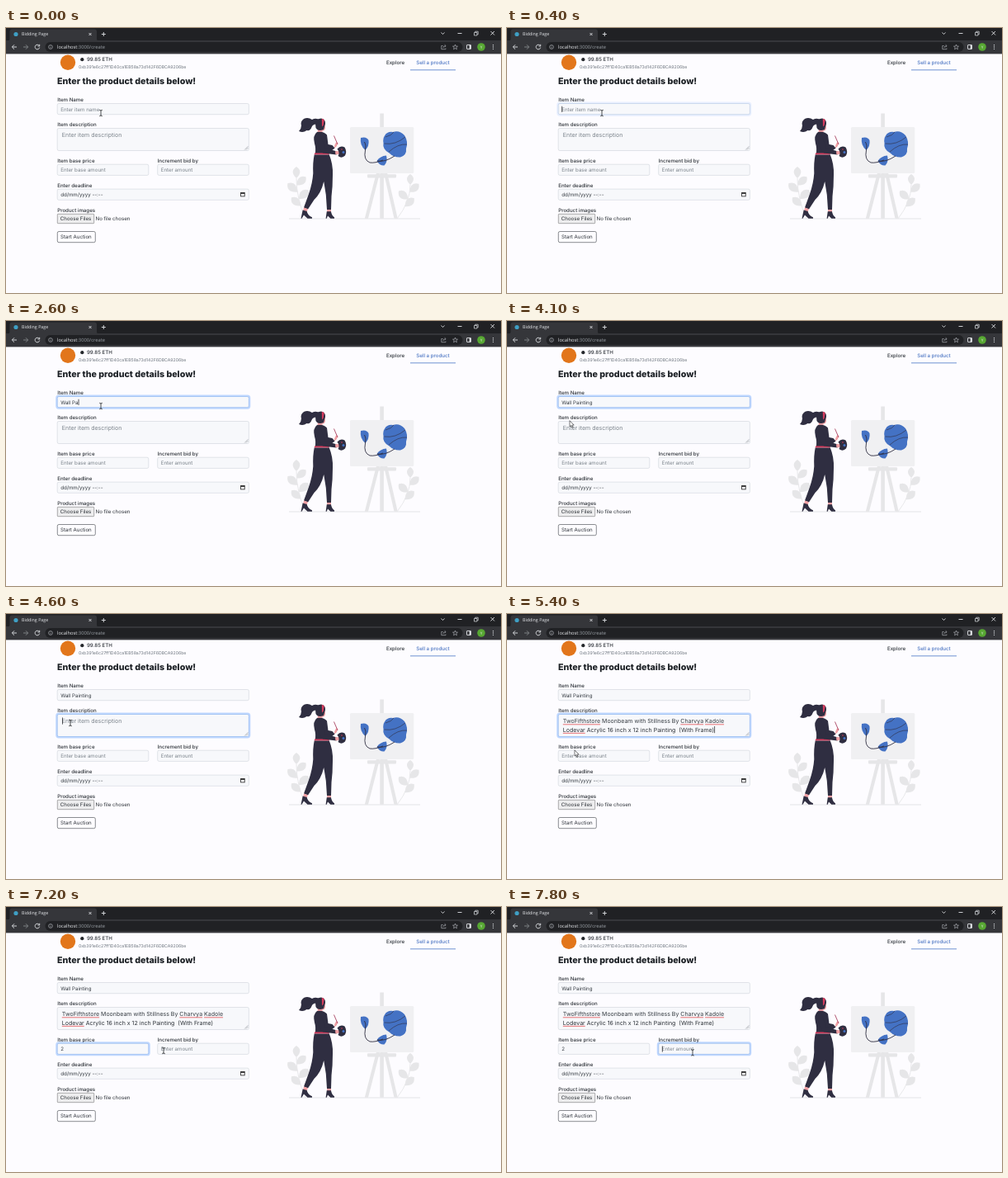
An HTML page that plays this animation: 600 by 321 pixels, repeating every 8000 ms.

```html
<!DOCTYPE html>
<html lang="en">
<head>
<meta charset="utf-8">
<title>Bidding Page</title>
<style>
  html, body { margin: 0; width: 100%; height: 100%; overflow: hidden; background: #fdfcff; }
  svg { display: block; width: 100%; height: 100%; }
  text { font-family: Inter, sans-serif; font-size: 6.15px; fill: #2b3036; white-space: pre; text-rendering: geometricPrecision; }
  .ui { font-family: "Open Sans", sans-serif; fill: #e8eaed; }
  .label, .nav { font-weight: 500; }
  .hint { fill: #6c757d; }
  .big { font-size: 7.03px; }
  .line { fill: none; stroke: #dfe1e5; stroke-width: .9; }
  .field { fill: #f7f8fb; stroke: #ced4da; stroke-width: .6; }
  .dark { fill: #2f2e41; }
  .skin { fill: #f0a0a4; }
  .red { fill: #d63c5e; }
  .blue { fill: #4472c4; }
  .pale { fill: #e6e6e8; }
  .ink { fill: none; stroke: #2f2e41; stroke-width: .9; }
</style>
</head>
<body>
<svg viewBox="0 0 600 321">
  <rect width="600" height="321" fill="#fdfcff"/>

  <!-- browser bar -->
  <rect width="600" height="16" fill="#202124"/>
  <path d="M2 15.5Q4.500 15.500 4.500 13V4.500Q4.500 1.500 7.500 1.500H107Q110 1.500 110 4.500V13Q110 15.500 112.500 15.500Z" fill="#35363a"/>
  <rect y="15" width="600" height="16.400" fill="#35363a"/>
  <rect x="47.500" y="17" width="506" height="12" rx="6" fill="#202124"/>
  <circle cx="12" cy="7.500" r="2.600" fill="#3f9fc4"/>
  <text class="ui" x="19" y="9.400" style="font-size:5.3px">Bidding Page</text>
  <text class="ui" x="62" y="25.200" style="font-size:5.8px">localhost<tspan fill="#9aa0a6">:3000/create</tspan></text>
  <g class="line">
    <path d="M100.500 6L103.500 9M103.500 6L100.500 9M115.800 7.500H120.800M118.300 5V10"/>
    <path d="M527.500 5.500L529.500 7.500L531.500 5.500M547.500 6.500H552.500M587.500 4L592 8.500M592 4L587.500 8.500"/>
    <path d="M567.500 5.500H571V9H567.500ZM568.700 5.300V4.200H572.200V7.800H571.200" stroke-width=".7"/>
    <path d="M13 23H7.500M10 20.300L7.300 23L10 25.700"/>
    <path d="M21 23H26.500M24 20.300L26.700 23L24 25.700" stroke="#85888c"/>
    <path d="M40.300 21.500A2.800 2.800 0 1 0 40.700 23.600M40.700 19.800V22H38.500"/>
    <g stroke="#a9adb2" stroke-width=".7">
      <circle cx="54" cy="23" r="2.400"/>
      <path d="M54 22.700V24.400M54 21.500V22"/>
      <path d="M529.500 21.500H527.800V25.700H533V24.500M529.800 24Q530 21.700 532.800 21.700M531.700 20.300L533.200 21.700L531.700 23.100"/>
      <path d="M544.500 20L545.300 22.100L547.500 22.200L545.800 23.600L546.400 25.800L544.500 24.600L542.600 25.800L543.200 23.600L541.500 22.200L543.700 22.100Z"/>
    </g>
    <rect x="558.500" y="20.500" width="5" height="5" rx=".5"/>
    <path d="M562.400 20.500V25.500" stroke-width="1.500"/>
  </g>
  <circle cx="576" cy="23" r="4.800" fill="#57a832"/>
  <text class="ui" x="576" y="24.800" text-anchor="middle" style="font-size:4.8px">Y</text>
  <g fill="#dfe1e5"><circle cx="590.500" cy="20.700" r=".65"/><circle cx="590.500" cy="23" r=".65"/><circle cx="590.500" cy="25.300" r=".65"/></g>

  <!-- page header -->
  <circle cx="75" cy="41.700" r="9.200" fill="#e2761b"/>
  <circle cx="92.300" cy="38.200" r="2.100" fill="#25282c"/>
  <text class="nav" x="98" y="40.400">99.85 ETH</text>
  <text class="hint" x="88" y="48.600" style="font-size:5.2px">0xb391e6c27ff1D40ca1EB58a73d142F6DBCA9206be</text>
  <text class="nav" x="461" y="44.200">Explore</text>
  <text class="nav" x="497.300" y="44.200" style="fill:#4a74c2">Sell a product</text>
  <rect x="490" y="50.400" width="55" height=".9" fill="#5f86cc"/>
  <text x="62" y="68.200" style="font-size:10.7px;font-weight:800;fill:#1c2025">Enter the product details below!</text>

  <!-- form -->
  <g id="form"></g>
  <path d="M291 147.500L293.500 145M289.200 147.500L293.500 143.200" stroke="#777c82" stroke-width=".5"/>
  <g fill="none" stroke="#222" stroke-width=".8"><rect x="284.600" y="199.500" width="4.600" height="4.400"/><path d="M284.600 200.200H289.200" stroke-width="1.300"/></g>
  <rect x="62.300" y="225.300" width="44.400" height="11.400" rx=".8" fill="#ededee" stroke="#767676" stroke-width=".6"/>
  <text x="65.800" y="233.200">Choose Files</text>
  <text x="108.500" y="233.200">No file chosen</text>
  <rect x="62.300" y="246.500" width="46" height="13.200" rx="1.800" fill="#fdfcff" stroke="#2b3036" stroke-width=".55"/>
  <text x="66" y="255.400">Start Auction</text>

  <!-- illustration -->
  <rect x="343" y="230.600" width="159" height=".8" fill="#dcdce0"/>
  <g id="plants" class="pale"></g>
  <g class="pale">
    <rect x="453.300" y="103.500" width="4.600" height="20"/>
    <path d="M448.800 176H453L439 230.700H434.800ZM458 176H462.200L474.700 230.700H470.500Z"/>
    <rect x="453.300" y="176" width="4.600" height="54.700"/>
    <rect x="417" y="120" width="77.300" height="56" rx="1.500" fill="#f0f0f2"/>
    <rect x="438" y="177.200" width="35" height="4.200" rx="1"/>
  </g>
  <path class="blue" d="M459 130.500Q462 125 469 126Q477 123.500 483 130Q488 138 485 146Q486 154 478 156.500Q470 157 464.500 151.500Q456 147 457.500 139Q456.500 134 459 130.500Z"/>
  <path class="blue" d="M430 133Q437 131 439.500 136Q440.500 143 435.500 148Q428.500 142 430 133ZM461 154.500Q463 162 458.500 166.500Q453 167 449.500 161Q453.500 155 461 154.500Z"/>
  <path class="ink" d="M434.500 138Q437 141 435.500 148Q433 160 441 163Q447 164 457 160M450 161Q459 163 471 155"/>
  <path class="ink" style="stroke-width:.6" d="M460 132Q468 130 470 126M458.500 140Q472 142 484 132M464 150Q475 140 486 141"/>

  <path class="dark" d="M381 112Q376 108 371 111Q366 107.500 361 110Q356.500 113 358 118Q358 122 355 125Q360 127.500 364.500 124Q369 125 370.500 120Q372 116 377 116.500Z"/>
  <path class="skin" d="M380 116L386.800 115L387 121.500Q386 125 383.500 124.500L383.500 129H377.500L378 121Z"/>
  <path class="dark" d="M375 116Q376 109.500 382 109.500Q387.500 110.500 387 116Q386 119 385 123Q378 125.500 375.500 121Z"/>
  <path class="red" d="M382.800 109.700L385.800 111L384.600 118L383 119.500Z"/>
  <path class="skin" d="M398.500 141.500L400 138.500L402.300 138.800L401 143L397.500 146Z"/>
  <path d="M397.500 130.500L402 141" stroke="#a8405f" stroke-width=".9"/>
  <path class="dark" d="M377 126Q385 124.500 389 129.500L390.500 141L395.500 142L398.500 145.500Q395 149 390.500 149L391 153H374.500Q376 146 374 140Q371.500 130 377 126Z"/>
  <path class="red" d="M374 151.600H391.800V153.600H373.700Z"/>
  <path class="dark" d="M375 129Q380 127 382.500 133L386.500 145L401 149.500L400.500 153.500L384 151.500Q377.500 145 375 129Z"/>
  <path class="skin" d="M399 149.300L404 149L404.500 152.500L399.500 153.500Z"/>
  <path class="dark" d="M401.500 146.500Q405.500 141.500 410.500 144.500Q413.500 149.500 411 154.500Q407 158.500 402.500 155Q405 151 401.500 146.500Z"/>
  <g><circle class="red" cx="407" cy="147" r=".8"/><circle class="blue" cx="409" cy="150.500" r="1.500"/></g>
  <path class="dark" d="M373.700 153.600H391.800Q396.500 165 396 178Q396 192 394.500 204L394 220H389L387.800 202L385.200 186Q382 200 373.500 208L366 219.500L361 217.500L367 201Q371.500 188 372.300 176Q371.700 163 373.700 153.600Z"/>
  <path class="skin" d="M361 217.500L366 219.300L364.500 222.500L360.300 221ZM389 220H394V223H389.200Z"/>
  <path class="dark" d="M359.700 220.500L364.700 222Q365.500 227 371 229.200V230.700H365.500L361 226.500L358.500 230.700H357.500ZM388.800 222.300H394Q394.500 227 398 229.200V230.700H393.300L390 227.500L388.700 230.700H387.600Z"/>

  <g id="underlines" stroke="#e0363c" stroke-width=".7"></g>
  <rect id="caret" width=".7" fill="#16181b"/>
  <g id="mouse">
    <path id="beam" d="M-1.800 -3.700Q0 -3.700 0 -2.700Q0 -3.700 1.800 -3.700M0 -3V3M-1.800 3.700Q0 3.700 0 2.700Q0 3.700 1.800 3.700" fill="none" stroke="#25272a" stroke-width=".8"/>
    <path id="arrow" d="M0 0V7.300L1.700 5.800L2.900 8.500L4.100 8L2.900 5.400H5.200Z" fill="#fff" stroke="#1c1d1f" stroke-width=".6"/>
  </g>
</svg>
<script>
const LOOP = 8000, STEP = 100, ROW = 10.55;
const $ = id => document.getElementById(id);

function add(parent, tag, attrs, content = '') {
  const el = document.createElementNS('http://www.w3.org/2000/svg', tag);
  for (const k in attrs) el.setAttribute(k, attrs[k]);
  el.textContent = content;
  parent.append(el);
  return el;
}

// Form fields
function makeField(label, hint, x, y, w, h, big = false) {
  const form = $('form'), box = { x, y, width: w, height: h, rx: 1.8 };
  add(form, 'text', { class: 'label', x, y: y - 2.5 }, label);
  const ring = add(form, 'rect', { ...box, x: x - 1, y: y - 1, width: w + 2, height: h + 2, rx: 2.7,
    fill: 'none', stroke: '#0d6efd', 'stroke-opacity': .26, 'stroke-width': 1.9, opacity: 0 });
  add(form, 'rect', { ...box, class: 'field' });
  const edge = add(form, 'rect', { ...box, fill: 'none', stroke: '#86b7fe', 'stroke-width': .6, opacity: 0 });
  const tx = x + (big ? 5.6 : 4), ty = y + (big ? 10.5 : 9);
  const lines = [0, 1].map(i => add(form, 'text', { x: tx, y: ty + i * ROW, class: big ? 'big' : '' }));
  return { x, y, w, h, hint, big, tx, ty, ring, edge, lines };
}

const fields = {
  name: makeField('Item Name', 'Enter item name', 62.2, 91.5, 232.2, 13.2),
  about: makeField('Item description', 'Enter item description', 62.2, 121.5, 232.2, 27, true),
  price: makeField('Item base price', 'Enter base amount', 62.2, 165.2, 110.6, 13.2),
  raise: makeField('Increment bid by', 'Enter amount', 183.7, 165.2, 110.6, 13.2),
  date: makeField('Enter deadline', 'dd/mm/yyyy --:--', 62.2, 195.1, 232.2, 13.2)
};
add($('form'), 'text', { class: 'label', x: 62.2, y: 222.6 }, 'Product images');

// Plants: one stem with leaves to either side
function plant(x0, y0, x1, y1, sizes) {
  const g = $('plants');
  add(g, 'path', { d: `M${x0} ${y0}Q${x1} ${(y0 + y1) / 2} ${x1} ${y1}`, fill: 'none', stroke: '#e6e6e8', 'stroke-width': .9 });
  sizes.forEach((s, i) => {
    const k = i / sizes.length * .85, side = i ? (i % 2 ? 1 : -1) : 0;
    const x = x1 + (x0 - x1) * k * k, y = y1 + (y0 - y1) * k;
    add(g, 'path', { d: `M0 0Q${-s * .62} ${-s * .6} 0 ${-s}Q${s * .62} ${-s * .6} 0 0`,
      transform: `translate(${x} ${y}) rotate(${side * 48})` });
  });
}
plant(363, 231, 352, 182, [14, 15, 16, 16, 15]);
plant(474, 231, 490, 190, [13, 15, 15, 15]);

// Focus and input
const focusAt = [[400, 'name'], [4300, 'about'], [5800, 'price'], [7400, 'raise']];
const TITLE = 'Wall Painting';
const titleTimes = [1200, 1500, 1600, 1700, 1900, 2200, 2600, 2700, 2900, 3000, 3100, 3300, 3400];
const about = ['TwoFifthstore Moonbeam with Stillness By Charvya Kadole',
  'Lodevar Acrylic 16 inch x 12 inch Painting  (With Frame)'];
const unknown = [[0, 'TwoFifthstore'], [0, 'Charvya'], [0, 'Kadole'], [1, 'Lodevar']];
const PASTE = 5000, PRICE = 6600;
const inputs = [...focusAt.map(f => f[0]), ...titleTimes, PASTE, PRICE];

const path = [[0, 115, 103], [3800, 115, 103], [4000, 90, 113], [4100, 76, 120.7], [4300, 77, 129],
  [4600, 78, 132], [5000, 78, 133], [5400, 82, 164.8], [5600, 82.5, 165], [5800, 86.5, 172.3],
  [6700, 86.5, 172.3], [7000, 135, 172], [7300, 219, 175], [7500, 225, 176.3], [8000, 225, 176.3]];

function mouseAt(t) {
  const i = path.findIndex(p => p[0] > t), [a, b] = [path[i - 1], path[i]];
  const k = (t - a[0]) / (b[0] - a[0]);
  return [a[1] + (b[1] - a[1]) * k, a[2] + (b[2] - a[2]) * k];
}

function valueOf(id, t) {
  if (id === 'name') return [TITLE.slice(0, titleTimes.filter(s => s <= t).length)];
  if (id === 'about' && t >= PASTE) return about;
  if (id === 'price' && t >= PRICE) return ['2'];
  return [''];
}

function setFields(t, active) {
  for (const id in fields) {
    const f = fields[id], value = valueOf(id, t), empty = !value[0];
    f.lines[0].textContent = empty ? f.hint : value[0];
    f.lines[1].textContent = value[1] || '';
    f.lines[0].style.fill = empty && id !== 'date' ? '#7b838b' : '#343a40';
    let glow = 0;
    focusAt.forEach(([start, who], i) => {
      const end = i + 1 < focusAt.length ? focusAt[i + 1][0] : LOOP + 500;
      const ramp = s => Math.min(1, Math.max(0, (t - s + 50) / 150));
      if (who === id) glow = ramp(start) - ramp(end);
    });
    f.ring.setAttribute('opacity', glow);
    f.edge.setAttribute('opacity', glow);
  }
  $('underlines').style.display = t >= PASTE ? '' : 'none';

  const caret = $('caret');
  const last = Math.max(...inputs.filter(s => s <= t));
  const shown = active && (t - last) % 1000 < 500;
  caret.style.display = shown ? '' : 'none';
  if (!shown) return;
  const f = fields[active], value = valueOf(active, t), row = value.length - 1;
  const width = value[row] ? f.lines[row].getComputedTextLength() : 0;
  const size = f.big ? 8.2 : 7.2;
  caret.setAttribute('x', f.tx + width + .2);
  caret.setAttribute('y', f.ty + row * ROW - size * .8);
  caret.setAttribute('height', size);
}

function setMouse(t) {
  const [x, y] = mouseAt(t);
  const over = Object.values(fields).some(f => x > f.x && x < f.x + f.w && y > f.y && y < f.y + f.h);
  $('mouse').setAttribute('transform', `translate(${x} ${y})`);
  $('beam').style.display = over ? '' : 'none';
  $('arrow').style.display = over ? 'none' : '';
}

function drawUnderlines() {
  const f = fields.about;
  about.forEach((s, i) => f.lines[i].textContent = s);
  for (const [row, word] of unknown) {
    const at = about[row].indexOf(word), line = f.lines[row], y = f.ty + row * ROW + 1.8;
    add($('underlines'), 'line', { y1: y, y2: y,
      x1: line.getStartPositionOfChar(at).x,
      x2: line.getEndPositionOfChar(at + word.length - 1).x });
  }
}

let shownAt = -1;
const begin = performance.now();
function frame() {
  const t = Math.floor((performance.now() - begin) % LOOP / STEP) * STEP;
  if (t !== shownAt) {
    shownAt = t;
    const now = focusAt.filter(f => f[0] <= t).pop();
    setFields(t, now && now[1]);
    setMouse(t);
  }
  requestAnimationFrame(frame);
}
drawUnderlines();
frame();
</script>
</body>
</html>
```
